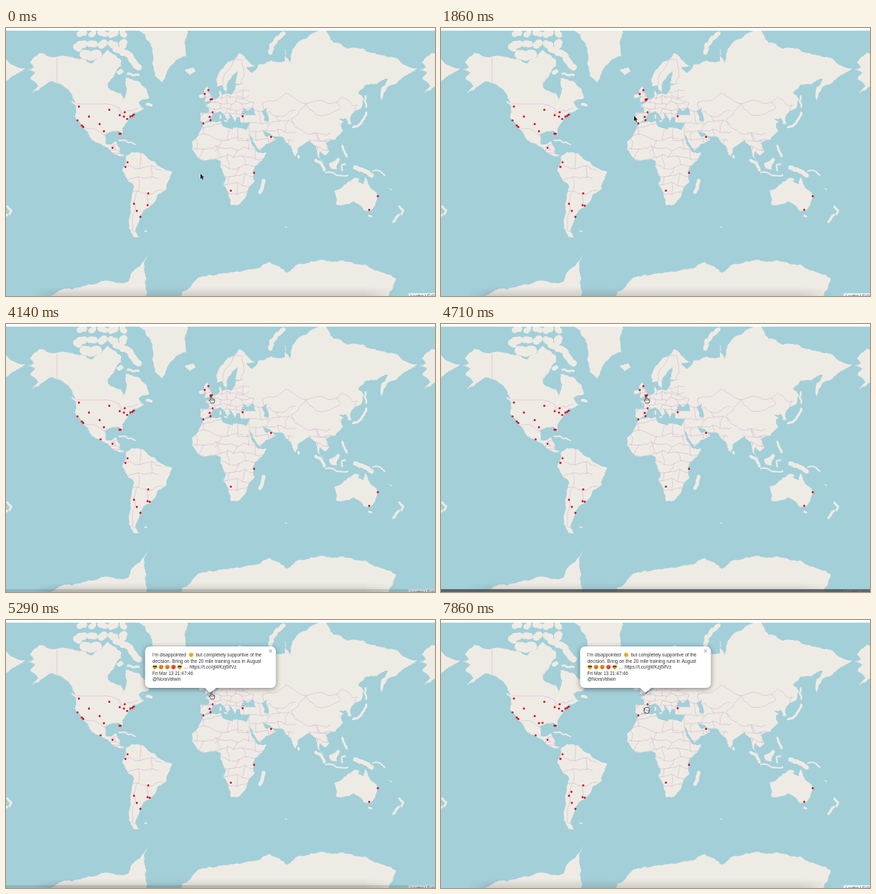
An HTML page with a canvas for the animation above (8000 ms loop, 600 px wide and 375 px high).

```html
<!DOCTYPE html>
<html lang="en">
<head>
<meta charset="utf-8">
<title>Live map</title>
<style>
html, body { margin: 0; width: 100%; height: 100%; overflow: hidden; background: #a3cfd9; }
canvas { display: block; width: 100vw; height: 100vh; }
</style>
</head>
<body>
<canvas id="stage"></canvas>
<script>
const W = 600, H = 375, LOOP = 8000, FPS = 7;
const WATER = '#a3cfd9', LAND = '#eeebe4', BORDER = '#d8b8d6', RED = '#d4001c';
const FONT = '"Liberation Sans", Arial, sans-serif';

// Key corners as "lon,lat"; the detail between them comes from rough().
const northAmerica = `-168,65.6 -162,66.5 -166,68.3 -157,71.3 -128,70 -108,68 -94,72 -82,69 -82,67 -88,64
 -94.5,60 -92.5,57 -82.5,55 -80,51.3 -76.6,57.2 -77.5,62.4 -69.6,61 -64.5,60.3 -56,52.5 -66,50 -61,45.8
 -70,43.5 -76,37 -81,31.8 -80.5,25.2 -84,30 -97.3,27.5 -96,19 -90.8,18.8 -87,21.5 -83.3,15 -83.5,10 -78,9
 -83,8.2 -94.5,16 -105.5,20.5 -114.5,31.5 -110,23 -117,32.5 -124.3,40.3 -124,48.4 -134,58 -146,60.8
 -158,56.5 -164,55 -158,58.5 -165.5,62 -161,64.3`;
const southAmerica = `-77.5,8.5 -72,12 -62,10.7 -51,3 -44.5,-2.5 -35,-6 -39,-15 -41,-22 -48.5,-26 -53,-33.5
 -57,-36.5 -62,-39 -65,-42 -66.5,-47 -69,-51 -65.5,-55 -70,-55 -75,-50 -73,-40 -70.3,-18.5 -76,-14 -81,-5 -77.5,4`;
const africa = `-6,35.8 10,37.3 11,34 20,31 21,32.8 32.5,31 37.2,20 43.2,11.7 51,11.9 47,4 39.2,-5 40.5,-15
 35,-20 32.5,-28 26,-34 19,-34.5 11.8,-17 13.8,-11 9,-1 9.3,4 5,6 -7.5,4.4 -13,8.7 -17,14.7 -17,21 -9.7,30`;
const europe = `27,40.5 24,40.5 22.8,36.6 19.4,41.5 13,45.5 18.4,40.2 15.8,38 9,44.3 3.2,43.2 -0.5,38.5 -5.6,36
 -9,37.5 -9,43.3 -1.6,43.5 -1.2,46 -4.5,48.3 1.7,51 8.5,53.6 8.5,57 10.8,54 20,54.5 23.5,59.2 30,60 22.5,60
 25,65.3 17.5,61.5 14.3,55.4 11,59 6,58.3 5.5,62 14,67.5 25.7,71.1 41,67 33,66.6 38,64.3 44,67.5`;
const asia = `68,68.5 68,72.5 73,68 76,72.5 87,75 104,77.6 113,74 140,72.5 170,69.8 190,66.2 178,63 163.5,58.5
 157,51 157,58 163,62 142,59.2 135.5,54.7 141,52 139,47 128.5,40.5 129.3,35.3 126.4,35 125,39.5 118,39
 122.5,37 119.5,35 121.8,30 114,22.5 106,20 109.2,12.5 105,8.8 100.8,13 99.7,9 104,1.5 98.3,9 97,17 91,22.3
 80.5,15.5 78,8 73,18 67,24.8 57,26 48,30 51.5,25 56,26 59.7,22.5 45,12.8 39,21.5 32.6,30 36,36.5 27.3,37`;
const smaller = `-73,78 -60,76 -53.5,68 -51,63 -44,60 -40,65 -22,70.3 -19,79
 / -24,65.5 -16,66.5 -13.6,65 -19,63.4 / -5.5,50 1.3,51.2 -2,56 -3,58.6 -6,56.5 -4,53
 / 109,1.5 117,7 119,5 116,-4 110.3,-3
 / 113.7,-23 115.5,-34 123.7,-33.9 131,-31.5 138,-35 141,-38.3 147,-38.5 151.5,-33.5 153,-25.5 146,-19
 142.5,-10.8 140.5,-17.5 135.5,-15 136.5,-12 131,-12 122.3,-18`;
const antarctica = `-152,-80 -147,-76 -120,-74 -100,-72.2 -76,-72.5 -67,-68 -57,-63.2 -61,-67 -60,-73 -58,-80
 / -30,-80 -26,-75 -12,-71.4 10,-70 32,-69 54,-66 63,-67.6 70,-69.8 87,-66.7 111,-66 130,-66.2 143,-67
 160,-70 170,-71.5 163,-80`;
const seas = '28,42 31,46.5 33.5,44.5 39,47 41.5,41.6 35,42 / 47,44.5 52,46.7 51,44 53.5,40 53.5,37 49,38 49.5,41';

// Long islands are thick rough strokes: [width, course].
const islands = [
  [13, '-116,70.8 -104,70.8'], [10, '-123,73 -121,72.6'], [9, '-87,72.3 -74,70.5 -66,66.5'], [3, '-76,64 -66,63.5'],
  [6, '-84,64.5 -82,65'], [4, '-58,48.7 -54.5,48.2'], [2, '-127,50.3 -124.5,49'], [2, '-84,22.3 -76,20.5 -69,18.8'],
  [5, '-9,53.3 -7,53.6'], [2.2, '9,41.5 9,39.6'], [2, '13,37.6 15,37.4'], [6, '55,71.3 56,73.5 67,76.2'],
  [5, '48.8,-14 45.5,-24'], [2.5, '142.7,53.5 143,47'], [3.2, '131,33 138,35.8 141,39.5 143,43.5'],
  [3, '80.7,8.5 81,7'], [3, '121,17.5 121.8,14 125,8'], [4, '96.5,4.5 104.5,-4.5'], [2, '106,-6.8 114,-8 126,-9'],
  [2.2, '124,1 120.5,0 121,-5'], [6, '133,-2 141,-5 148,-9.5'], [2, '149,-5.5 152,-4.5 160,-9'],
  [3, '145.8,-42 147.5,-42.5'], [3, '173.5,-35.5 177,-38.5 175.5,-41'], [3.4, '173,-41.5 168,-46'],
  [1.2, '164.5,-20.8 166.5,-22'], [1.4, '-60.5,-51.7 -58.5,-51.7'], [1.3, '69,-49.2 70,-49.4']];

const straight = `-123,49 -95,49 -88,48 / -141,69.6 -141,60.3 / 25,31.7 25,22 37,22`;
const winding = `-88,48 -84,46.5 -82.5,42.5 -71,45.2 -67,46 / -141,60.3 -130,55.5 / -117,32.5 -106.5,31.8 -97.2,26
 / -67,-22.8 -70,-31 -71.8,-45 -72,-51 -68.4,-52.3 / 49,46 48,50 61,51 69,55.3 87.5,49.1 98,51 116,49.8 121,53
 131,47.8 135,48.4 130.6,42.4 / 87.5,49.1 96,42.7 105,41.6 119.7,46.8 116,49.8 / 87.5,49.1 80.2,42.2 74,39
 79,32.5 88,27.9 97.3,28.2 101,21.5 108,21.5 / 28,60.5 31,62.8 29,69 21,69 12.2,63 11.5,59.1
 / 23.5,54 31,52 40,49.6 38,47`;

// Smaller countries: a jittered brick lattice, [west, north, east, south, cell].
const lattices = [[-16, 35, 24, 15, 17], [-16, 15, 48, -30, 12], [-7, 56, 31, 39, 8], [36, 43, 74, 16, 13],
  [92, 27, 108, 11, 10], [-79, 9, -53, -33, 17], [-92, 18, -82, 8, 6]];

const marks = [
  [102, 110], [116, 124], [100, 129.3], [106, 136.5], [108, 138.5], [131, 134.5], [137, 144.5], [144.5, 114.5],
  [159, 122], [166, 118], [165, 124], [169.5, 127.3], [174, 124], [176.7, 123], [178.8, 121.3], [160.5, 148],
  [158.8, 148], [149, 167.7], [170, 188], [167, 194.5], [199, 231.5], [179, 246], [198, 248], [183, 256],
  [188, 264.3], [278, 92.3], [283, 87], [286, 100], [288, 99.7], [289, 118], [285, 124.5], [286, 129],
  [276, 133.5], [331, 123.5], [370.7, 152.5], [347, 202.7], [314.5, 227.7], [520, 235.3], [508, 254.5]];
// Markers that appear later: [step, x, y].
const arrivals = [[3, 201, 248.7], [8, 286.5, 101.2], [18, 132.3, 161.3], [51, 142, 144], [55, 182.5, 240.5]];

// Pointer tip: [step, x, y].
const path = [[0, 272, 204], [5, 271, 165], [7, 271, 165], [13, 270, 123], [22, 287, 101], [37, 287, 101],
  [42, 270, 109], [44, 270, 109], [49, 284, 125], [52, 287, 121], [56, 287, 121]];

const canvas = document.getElementById('stage');
const g = canvas.getContext('2d');
const base = document.createElement('canvas');

const PX = 1.523, R = PX * 180 / Math.PI;
const project = ([lon, lat]) =>
  [286 + lon * PX, 192 - R * Math.log(Math.tan(Math.PI / 4 + lat * Math.PI / 360))];
const lines = text => text.split('/').map(s =>
  s.trim().split(/\s+/).map(p => project(p.split(',').map(Number))));

const clamp = v => Math.max(0, Math.min(1, v));
const noise = (x, y) => { const s = Math.sin(x * 12.99 + y * 78.23) * 43758.5; return s - Math.floor(s) - 0.5; };

// Midpoint displacement: turns a straight edge into a natural one.
function rough(c, a, b, amount) {
  const dx = b[0] - a[0], dy = b[1] - a[1];
  if (Math.hypot(dx, dy) < 2.5) return c.lineTo(b[0], b[1]);
  const k = noise(a[0] + b[0], a[1] + b[1]) * amount;
  const m = [(a[0] + b[0]) / 2 - dy * k, (a[1] + b[1]) / 2 + dx * k];
  rough(c, a, m, amount);
  rough(c, m, b, amount);
}

function trace(c, pts, amount) {
  c.moveTo(...pts[0]);
  for (let i = 1; i < pts.length; i++) rough(c, pts[i - 1], pts[i], amount);
}

function shape(texts, amount) {
  const p = new Path2D();
  for (const pts of texts.flatMap(lines)) trace(p, [...pts, pts[0]], amount);
  return p;
}

function course(texts, amount) {
  const p = new Path2D();
  for (const pts of texts.flatMap(lines)) trace(p, pts, amount);
  return p;
}

function lattice([west, north, east, south, cell]) {
  const p = new Path2D();
  const [x0, y0] = project([west, north]), [x1, y1] = project([east, south]);
  const node = (i, j) => {
    const x = x0 + i * cell, y = y0 + j * cell;
    return [x + noise(x, y) * cell * 0.7, y + noise(y, x) * cell * 0.7];
  };
  for (let i = 0; i * cell <= x1 - x0; i++) {
    for (let j = 0; j * cell <= y1 - y0; j++) {
      trace(p, [node(i, j), node(i + 1, j)], 0.25);
      if ((i + j) % 2) trace(p, [node(i, j), node(i, j + 1)], 0.25);
    }
  }
  return p;
}

function drawWorld(c, land) {
  c.fillStyle = c.strokeStyle = LAND;
  c.fill(land);
  for (const [width, text] of islands) {
    c.lineWidth = width;
    c.stroke(course([text], 0.3));
  }
  // Arctic archipelago.
  for (let lon = -118; lon < -78; lon += 9.5) {
    for (const lat of [73.7, 76.2]) {
      const [x, y] = project([lon, lat]), turn = noise(lon, lat) * 3;
      const dx = Math.cos(turn) * 3.5, dy = Math.sin(turn) * 2;
      c.lineWidth = 8.5 + noise(lat, lon) * 4;
      c.beginPath();
      trace(c, [[x - dx, y - dy], [x + dx, y + dy]], 0.6);
      c.stroke();
    }
  }
  c.fillStyle = WATER;
  c.fill(shape([seas], 0.25));

  c.save();
  c.clip(land);
  c.strokeStyle = BORDER;
  c.lineWidth = 0.7;
  c.stroke(course([straight], 0));
  c.stroke(course([winding], 0.2));
  for (const area of lattices) c.stroke(lattice(area));
  c.restore();
}

function drawMap(c) {
  c.fillStyle = WATER;
  c.fillRect(0, 0, W, H);
  c.lineJoin = c.lineCap = 'round';
  const land = shape([northAmerica, southAmerica, africa, europe + ' ' + asia, smaller, antarctica], 0.24);
  for (const turn of [-1, 0, 1]) {
    c.save();
    c.translate(turn * 360 * PX, 0);
    drawWorld(c, land);
    c.restore();
  }
  c.fillStyle = '#fff';
  c.fillRect(0, 0, W, 3.7);

  // Attribution, cut by the lower edge.
  c.fillStyle = 'rgba(255,255,255,.7)';
  c.fillRect(563, 371, 37, 4);
  c.fillStyle = '#444';
  c.font = '6px ' + FONT;
  c.fillText('Leaflet | © OpenStreetMap', 566, 376.6);

  // Soft shade along the lower edge.
  const fade = c.createLinearGradient(0, 362, 0, 375);
  fade.addColorStop(0, 'rgba(110,115,115,0)');
  fade.addColorStop(1, 'rgba(110,115,115,.26)');
  c.fillStyle = fade;
  for (let x = 36; x < 550; x += 2) {
    c.globalAlpha = clamp((x - 36) / 30) * clamp((550 - x) / 50);
    c.fillRect(x, 362, 2, 13);
  }
  c.globalAlpha = 1;
}

function dot(x, y, r, color) {
  g.fillStyle = color;
  g.beginPath();
  g.arc(x, y, r, 0, 7);
  g.fill();
}

function face(x, y, color, shades) {
  const dark = '#4a2a12';
  dot(x, y, 3.1, color);
  g.fillStyle = g.strokeStyle = dark;
  if (shades) g.fillRect(x - 2.8, y - 1.5, 5.6, 1.7);
  else for (const side of [-1.1, 1.1]) dot(x + side, y - 0.4, 0.45, dark);
  g.lineWidth = 0.5;
  g.beginPath();
  if (shades) g.arc(x, y + 0.4, 1.4, 0.4, 2.7);
  else g.arc(x, y + 2.3, 1.1, 3.6, 5.8);
  g.stroke();
}

function drawPopup(alpha) {
  const ratio = canvas.width / W;
  g.save();
  g.globalAlpha = alpha;
  g.shadowColor = 'rgba(0,0,0,.45)';
  g.shadowBlur = 7 * ratio;
  g.shadowOffsetY = 1.5 * ratio;
  g.fillStyle = '#fff';
  g.beginPath();
  g.roundRect(194.5, 37, 183, 58, 6.5);
  g.moveTo(277.5, 94.5); g.lineTo(294.5, 94.5); g.lineTo(286, 102);
  g.fill();
  g.shadowColor = 'transparent';

  g.fillStyle = '#333';
  g.font = '6.53px ' + FONT;
  const write = (s, x, row) => g.fillText(s, x, 50.9 + row * 8.6);
  write("I'm disappointed", 204.7, 0);
  write('but completely supportive of the', 265.5, 0);
  write('decision. Bring on the 20 mile training runs in August', 204.7, 1);
  write('… https://t.co/gWKzj6IfVz', 248.3, 2);
  write('Fri Mar 13 21:47:46', 204.7, 3);
  write('@NoraVelwin', 204.7, 4);
  face(259, 48.7, '#f6bd3c', false);
  for (let i = 0; i < 5; i++) {
    const cool = i % 4 === 0;
    face(208.3 + i * 8.65, 65.8, cool ? '#f3b938' : i === 3 ? '#e2553a' : '#e5872f', cool);
  }
  g.strokeStyle = '#b5b5b5';
  g.lineWidth = 1.2;
  g.beginPath();
  for (const d of [-2, 2]) { g.moveTo(370 - d, 41.4); g.lineTo(370 + d, 45.4); }
  g.stroke();
  g.restore();
}

const arrow = new Path2D('M0 0V7.2L1.7 5.7L2.9 8.4L4.1 7.9L2.9 5.2H5.2Z');
const pointing = new Path2D('M-.8 .6Q0-.4 .8 .6V3.6L4 4.3Q5 4.6 4.8 6L4 9.6H-.3L-3.2 5.8Q-3 4.6-1.8 5.2L-.8 6Z');
const open = new Path2D('M-2.4 2.2Q-1.6 1.2-.8 2.1Q-.1 .4 .9 1.5Q2 .6 2.7 2.2Q4.2 1.8 4.5 3.3L4 6.6L3.3 9.4H-.4L-3.2 6Q-3.4 4.6-1.9 5.2Z');

function drawPointer(step) {
  const i = path.findIndex(k => k[0] > step);
  const [s0, x0, y0] = path[i - 1], [s1, x1, y1] = path[i];
  const u = (step - s0) / (s1 - s0), e = u * u * (3 - 2 * u);
  g.save();
  g.translate(x0 + (x1 - x0) * e, y0 + (y1 - y0) * e);
  g.lineJoin = 'round';
  if (step < 26) {
    g.strokeStyle = '#fff';
    g.lineWidth = 0.9;
    g.stroke(arrow);
    g.fillStyle = '#111';
    g.fill(arrow);
  } else {
    const hand = step < 38 ? pointing : open;
    g.fillStyle = '#fff';
    g.fill(hand);
    g.strokeStyle = '#222';
    g.lineWidth = 0.8;
    g.stroke(hand);
    g.lineWidth = 0.5;
    g.beginPath();
    for (const x of [0.5, 1.9, 3.2]) { g.moveTo(x, 4.6); g.lineTo(x, 6.6); }
    g.stroke();
  }
  g.restore();
}

function drawBar(step) {
  const a = step < 35 ? clamp((step - 27) / 4) : clamp(1 - (step - 34) / 4);
  g.fillStyle = `rgba(70,74,77,${0.8 * a})`;
  g.fillRect(0, 371, W, 4);
}

function draw(ms) {
  const step = Math.floor((ms % LOOP) * FPS / 1000 + 1e-6);
  g.drawImage(base, 0, 0, W, H);
  for (const [x, y] of marks) dot(x, y, 1.4, RED);
  for (const [s, x, y] of arrivals) if (step >= s) dot(x, y, 1.4, RED);
  drawBar(step);
  if (step >= 35) drawPopup(clamp((step - 34) / 2));
  drawPointer(step);
}

function resize() {
  const ratio = window.devicePixelRatio || 1;
  for (const c of [canvas, base]) {
    c.width = Math.round(innerWidth * ratio);
    c.height = Math.round(innerHeight * ratio);
    c.getContext('2d').scale(c.width / W, c.height / H);
  }
  drawMap(base.getContext('2d'));
}

resize();
addEventListener('resize', resize);
const start = performance.now();
function tick() {
  draw(performance.now() - start);
  requestAnimationFrame(tick);
}
tick();
</script>
</body>
</html>
```
